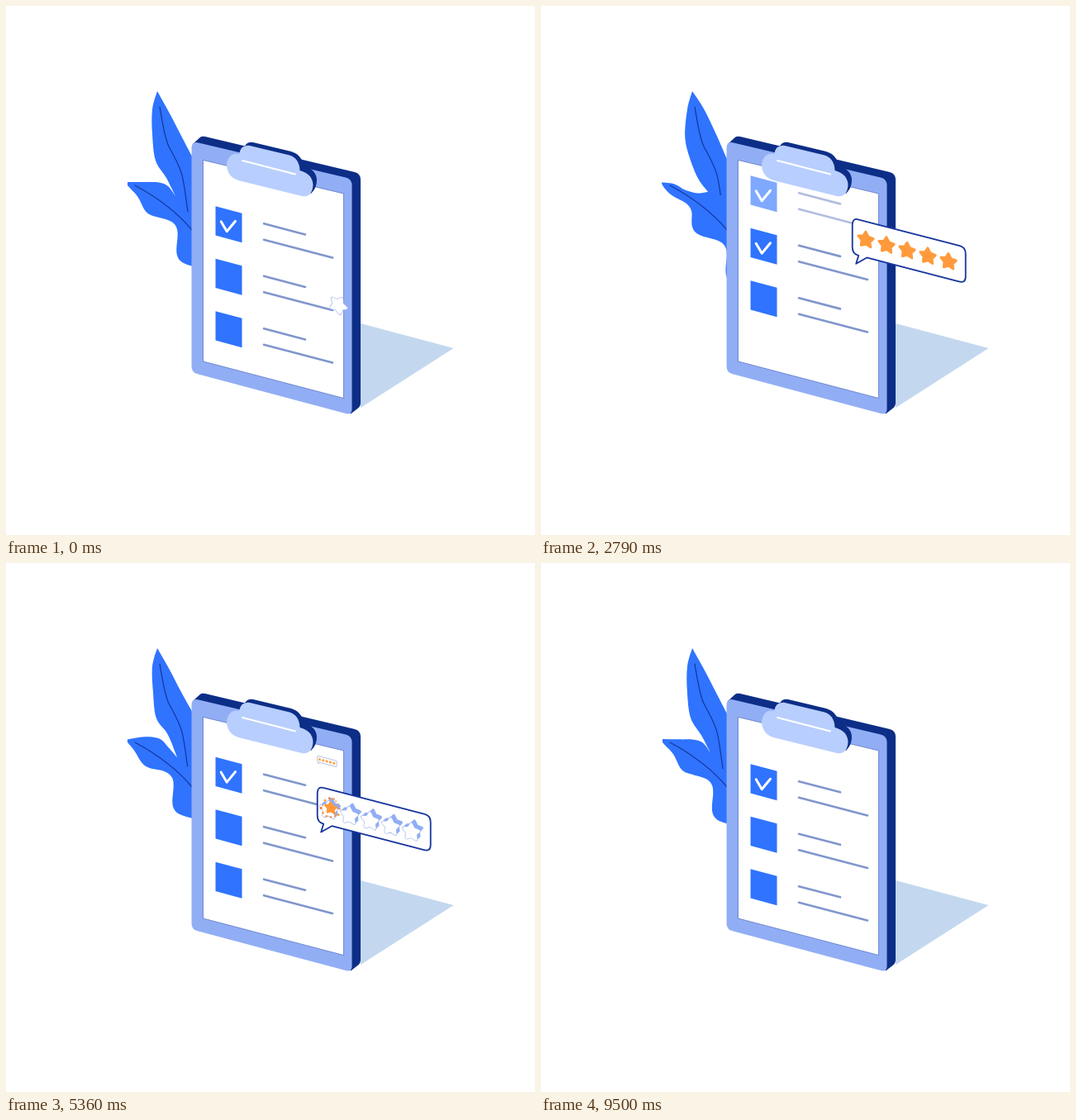
Write an HTML page with a canvas that moves like this. It is 640 px wide and 640 px high and loops after 9570 ms.

```html
<!DOCTYPE html>
<html lang="en">
<head>
<meta charset="utf-8">
<title>Checklist review</title>
<style>
html, body { margin: 0; width: 100%; height: 100%; overflow: hidden; background: #fff; }
canvas { display: block; width: 100vw; height: 100vh; }
</style>
</head>
<body>
<canvas id="stage" width="640" height="640"></canvas>
<script>
const ctx = document.getElementById('stage').getContext('2d');
const LOOP = 9570, CYCLE = LOOP / 2, BUBBLE_GAP = 4020;
const TAU = Math.PI * 2;
const BLUE = '#2f73ff', NAVY = '#0c2e87', FACE = '#91aef5', PALE = '#b8cefe',
      RULE = '#8096cc', INK = '#15359c', ORANGE = '#ff9a3c';

const clamp = v => Math.max(0, Math.min(1, v));
const ramp = (t, a, b) => clamp((t - a) / (b - a));
const easeOut = u => 1 - (1 - u) ** 2;
const easeInOut = u => u * u * (3 - 2 * u);
const mix = (a, b, u) => a + (b - a) * u;

function fill(d, color) {
  ctx.fillStyle = color;
  ctx.fill(new Path2D(d));
}

function stroke(d, color, width) {
  ctx.strokeStyle = color;
  ctx.lineWidth = width;
  ctx.lineCap = ctx.lineJoin = 'round';
  ctx.stroke(new Path2D(d));
}

// Smooth curve through points, continuing the current path.
function spline(p) {
  ctx.lineTo(...p[0]);
  for (let i = 0; i < p.length - 1; i++) {
    const a = p[i - 1] || p[i], b = p[i], c = p[i + 1], d = p[i + 2] || c;
    ctx.bezierCurveTo(
      b[0] + (c[0] - a[0]) / 6, b[1] + (c[1] - a[1]) / 6,
      c[0] - (d[0] - b[0]) / 6, c[1] - (d[1] - b[1]) / 6, c[0], c[1]);
  }
}

// Upper leaf outline at three evenly spaced phases of the sway.
const LEAF = [
  [[224,180],[212,157],[198,130],[183,103],[177,125],[177,155],[181,187],[194,208],[205,230],[196,218],[185,213.5],[168,213],[147,213]],
  [[224,178],[211,153],[196,123],[183,103],[177,125],[177,158],[182,187],[195,208],[207,236],[193,231],[180,217],[164,210],[146,214]],
  [[224,184],[212,156],[198,127],[183,103],[177,125],[174,158],[180,185],[190,210],[201,222],[190,222.5],[175,222],[163,217],[146,213]]
];

function drawPlant(ph) {
  const w = LEAF.map((_, k) => (1 + 2 * Math.cos(TAU * (ph - k / 3))) / 3);
  const top = LEAF[0].map((_, i) => [0, 1].map(
    c => w.reduce((sum, wk, k) => sum + wk * LEAF[k][i][c], 0)));

  // The lower edge is a wave running towards the leaf tip.
  const low = [];
  for (let s = 0; s <= 150; s += 6) {
    const o = 10 * (1 - Math.cos(TAU * ((s - 36.6) / 72 + ph))) * Math.min(1, s / 50) ** 1.5;
    low.push([147 + 0.571 * s + 0.821 * o, 217 + 0.821 * s - 0.571 * o]);
  }
  ctx.beginPath();
  ctx.moveTo(245, 225);
  spline(top.slice(0, 4));
  spline(top.slice(3, 9));
  spline(top.slice(8));
  spline(low);
  ctx.closePath();
  ctx.fillStyle = BLUE;
  ctx.fill();

  const sway = Math.cos(TAU * ph);
  stroke(`M186 122C190 145 192 160 197 170S211 193 214 209S217 228 ${218.5 + 1.5 * sway} ${238 + 11 * sway}`, INK, 1.2);
  stroke('M156 217C180 230 205 247 225 271', INK, 1.2);
}

function drawBoard() {
  fill('M429 384L541.5 414L429 486Z', '#c3d8ef');
  fill('M226 167L235 158.8Q237 157 241 158L422 201Q429 203 429 210L429 480Q429 484 426 486.500L417 493.5Z', NAVY);
  fill('M224.5 172Q224.5 163.500 233 165.500L411 207.500Q418.5 209.500 418.5 217L418.5 488Q418.5 495 411 493L231 445Q224.5 443 224.5 436Z', FACE);
  const paper = 'M238.700 186.500L408.500 227V474.500L238.700 430Z';
  fill(paper, '#fff');
  stroke(paper, '#4f6bbd', 0.7);
}

function drawClip() {
  fill('M283 176L290 168Q293 164 299 165L345 176Q358 180 360 193.500Q376 198 376 211Q376 220 369 227L330 200Z', NAVY);
  fill('M282 179Q284 167.500 295 169L342 180.300Q355 184 355.500 199Q371 203 371.500 217Q370 232 358 230L281 211Q267 206 267 191.500Q269 179 279 178.500Z', PALE);
  stroke('M286 187L350 203.500', '#fff', 2);
}

function rule(y, length, u) {
  if (u > 0) stroke(`M312 ${y}l${length * u} ${length * u * 0.262}`, RULE, 2.6);
}

// age is counted in cycles; 0 is when the item reaches the first row.
function drawItem(age) {
  const size = easeOut(ramp(age, -2.41, -2.3));
  const alpha = 1 - ramp(age, 0.44, 0.81);
  if (!size || !alpha) return;
  ctx.save();
  ctx.globalAlpha = alpha;
  ctx.translate(0, 242.3 - 63.5 * age);
  rule(21, 50, easeOut(ramp(age, -2.4, -2.28)));
  rule(40.5, 83, easeOut(ramp(age, -2.18, -2.025)));
  ctx.translate(269.5, 22);
  ctx.scale(size, size);
  fill('M-16 -22L16 -13.500V22L-16 13.300Z', BLUE);
  ctx.globalAlpha = 1;
  const tick = easeOut(ramp(age, -0.55, -0.42));
  if (tick) {
    ctx.scale(tick, tick);
    stroke('M-9.300 -3.500L-2.300 8.500L8 -4', '#fff', 3);
  }
  ctx.restore();
}

function star(x, y, size, turn, color, edge) {
  if (size <= 0) return;
  ctx.save();
  ctx.translate(x, y);
  ctx.transform(1, 0.2, 0, 1, 0, 0);
  ctx.rotate(turn);
  ctx.scale(size, size);
  ctx.beginPath();
  for (let i = 0; i < 10; i++) {
    const r = i % 2 ? 5.2 : 9.6, a = i * TAU / 10 - TAU / 4;
    ctx.lineTo(r * Math.cos(a), r * Math.sin(a));
  }
  ctx.closePath();
  ctx.lineJoin = 'round';
  if (edge) {
    ctx.strokeStyle = edge;
    ctx.lineWidth = 4.4;
    ctx.stroke();
  }
  ctx.strokeStyle = ctx.fillStyle = color;
  ctx.lineWidth = 3;
  ctx.stroke();
  ctx.fill();
  ctx.restore();
}

function burst(x, y, u, seed) {
  if (u <= 0 || u >= 1) return;
  for (let i = 0; i < 13; i++) {
    const noise = Math.abs(Math.sin((i + 1) * 12.9 + seed * 7.3) * 437.5) % 1;
    const a = (i + noise * 0.7) * TAU / 13;
    const r = mix(7, 15 + 8 * noise, easeOut(u));
    ctx.fillStyle = i % 3 ? ORANGE : '#f4803f';
    ctx.beginPath();
    ctx.arc(x + r * Math.cos(a), y + r * Math.sin(a), (0.9 + noise) * (1 - u * u), 0, TAU);
    ctx.fill();
  }
}

function bubblePath(w, tail) {
  const top = x => 0.26 * x - 1.3, low = x => 0.26 * x + 42.2;
  return `M0 8Q0 -2 8 ${top(8)}L${w - 7} ${top(w - 7)}Q${w} ${top(w)} ${w} ${top(w) + 8}` +
    `V${low(w) - 8}Q${w} ${low(w)} ${w - 8} ${low(w - 8)}L17.5 ${low(17.5)}` +
    `L${mix(12, 4.5, tail)} ${mix(low(12), 54, tail)}L7.5 ${low(7.5)}Q0 ${low(0)} 0 34Z`;
}

function drawBubble(t) {
  if (t < 0 || t > 5400) return;
  const y = Math.min(275, 274 - 0.00945 * (t - 1070));
  const grow = easeInOut(ramp(t, 480, 960));
  const w = mix(34, 137, grow);
  const fly = easeOut(ramp(t, 0, 380));
  const shrink = ramp(t, 5150, 5400);
  const scale = (1 + 0.075 * ramp(t, 4800, 5150)) * (1 - shrink);

  ctx.save();
  ctx.translate(376.7, y);
  ctx.scale(scale, scale);

  const pop = easeOut(ramp(t, 320, 460));
  if (pop) {
    ctx.save();
    ctx.translate(16, 25);
    ctx.scale(pop, pop);
    ctx.translate(-16, -25);
    const d = bubblePath(w, easeOut(ramp(t, 880, 1040)));
    fill(d, '#fff');
    stroke(d, INK, 1.8);
    ctx.restore();
  }

  const depth = easeInOut(ramp(t, 700, 1020)) * (1 - ramp(t, 1250, 2100));
  for (let i = 0; i < 5; i++) {
    let sx = 16.3 + 25 * i, sy = 25 + 6.6 * i, turn = 0;
    let size = clamp((w - sx - 8) / 12);
    if (i === 0) {
      sx += 9 * (1 - fly);
      sy += 62 * (1 - fly);
      turn = 0.45 * (1 - fly);
      size = 1;
    }
    const start = 1250 + 200 * i;
    const lit = easeOut(ramp(t, start, start + 180));
    if (lit < 1) {
      for (let k = 4; k > 0 && depth > 0; k--) {
        const o = mix(-3, 1.5, k / 4) * depth;
        star(sx + o, sy - o, size, turn, FACE);
      }
      star(sx - 3 * depth, sy + 3 * depth, size, turn, '#fff', '#a5b8ee');
    }
    star(sx, sy, lit, 0, ORANGE);
  }
  for (let i = 0; i < 5; i++) {
    burst(16.3 + 25 * i, 25 + 6.6 * i, ramp(t, 1250 + 200 * i, 1700 + 200 * i), i);
  }
  ctx.restore();
}

function draw(now) {
  const t = now % LOOP, ph = t % CYCLE / CYCLE;
  ctx.fillStyle = '#fff';
  ctx.fillRect(0, 0, 640, 640);
  drawPlant(ph);
  drawBoard();
  for (let k = 0; k < 4; k++) drawItem(ph - k);
  drawClip();
  drawBubble(t);
  drawBubble(t - BUBBLE_GAP);
}

let begin;
function tick(now) {
  begin ??= now;
  draw(now - begin);
  requestAnimationFrame(tick);
}
draw(0);
requestAnimationFrame(tick);
</script>
</body>
</html>
```
